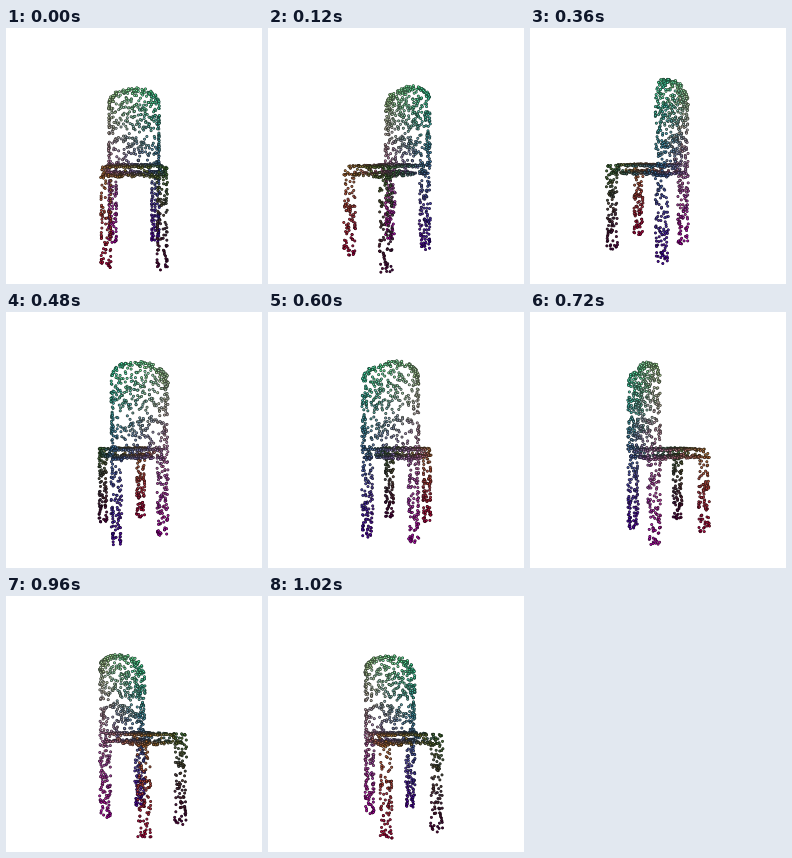
Recreate the animation shown at these times as a matplotlib script. Size 256x256 px, loop 1080 ms.

```python
import numpy as np
import matplotlib.pyplot as plt
from matplotlib.animation import FuncAnimation

SIZE, FRAMES, INTERVAL = 256, 18, 60
FOCAL = SIZE / 2 * np.sqrt(3)  # 60 degree field of view
DENSITY = 0.042                # points per square unit of surface
rng = np.random.default_rng(7)

# Axes: x to the right, y down, z towards the viewer.
HALF, BACK, FRONT = 26.8, -21.5, 43.8
TOP, SEAT, UNDER, FLOOR = -72.5, 9.3, 17, 91.5
RISE = 15


def scatter_box(lo, hi):
    """Random points on the surface of a box."""
    lo, hi = np.array(lo, float), np.array(hi, float)
    size = hi - lo
    faces = []
    for axis in range(3):
        area = np.prod(np.delete(size, axis))
        for side in (lo, hi):
            p = lo + size * rng.random((round(area * DENSITY), 3))
            p[:, axis] = side[axis]
            faces.append(p)
    return np.vstack(faces)


def arch_top(x):
    return TOP + RISE * (1 - np.sqrt(np.clip(1 - (x / HALF) ** 2, 0, 1)))


def scatter_backrest(z0, z1):
    """Random points on an upright panel with an arched top."""
    count = round(2 * 2 * HALF * (SEAT - TOP) * DENSITY * 0.85)
    x = rng.uniform(-HALF, HALF, count)
    y = rng.uniform(TOP, SEAT, count)
    panel = np.column_stack([x, y, rng.choice([z0, z1], count)])
    panel = panel[y > arch_top(x)]

    t = np.pi * rng.random(95)
    arch = np.column_stack([HALF * np.cos(t),
                            TOP + RISE * (1 - np.sin(t)),
                            rng.uniform(z0, z1, t.size)])
    arch[:, 1] += 4 * rng.random(t.size) ** 2

    n = 90
    sides = np.column_stack([rng.choice([-HALF, HALF], n),
                             rng.uniform(TOP + RISE, SEAT, n),
                             rng.uniform(z0, z1, n)])
    return np.vstack([panel, arch, sides])


def make_chair():
    parts = [scatter_box((-HALF, SEAT, BACK), (HALF, UNDER, FRONT)),
             scatter_backrest(BACK, BACK + 8.8)]
    for x in (-HALF, HALF - 7.6):
        for z, depth in ((BACK, 8.8), (FRONT - 7.8, 7.8)):
            parts.append(scatter_box((x, UNDER, z), (x + 7.6, FLOOR, z + depth)))
    return np.vstack(parts)


points = make_chair()
px, py, pz = points.T
colors = np.clip(np.column_stack([0.53 - 0.009 * px,
                                  (FLOOR - py) / (FLOOR - TOP),
                                  0.56 - 0.0078 * pz]), 0, 1)

fig = plt.figure(figsize=(SIZE / 100, SIZE / 100), dpi=100, facecolor="white")
ax = fig.add_axes([0, 0, 1, 1])
ax.set(xlim=(0, SIZE), ylim=(SIZE, 0))
ax.axis("off")
dots = ax.scatter(px, py, s=2.5, c=colors, linewidths=0.5)


def draw(i):
    a = 2 * np.pi * i / FRAMES
    x = px * np.cos(a) - pz * np.sin(a)
    z = px * np.sin(a) + pz * np.cos(a)
    scale = FOCAL / (FOCAL - z)
    order = np.argsort(z)
    dots.set_offsets((SIZE / 2 + np.column_stack([x, py]) * scale[:, None])[order])
    dots.set_facecolor(colors[order])
    dots.set_edgecolor(colors[order] * 0.25)
    return [dots]


anim = FuncAnimation(fig, draw, frames=FRAMES, interval=INTERVAL,
                     repeat=True, repeat_delay=0)
plt.show()
```
